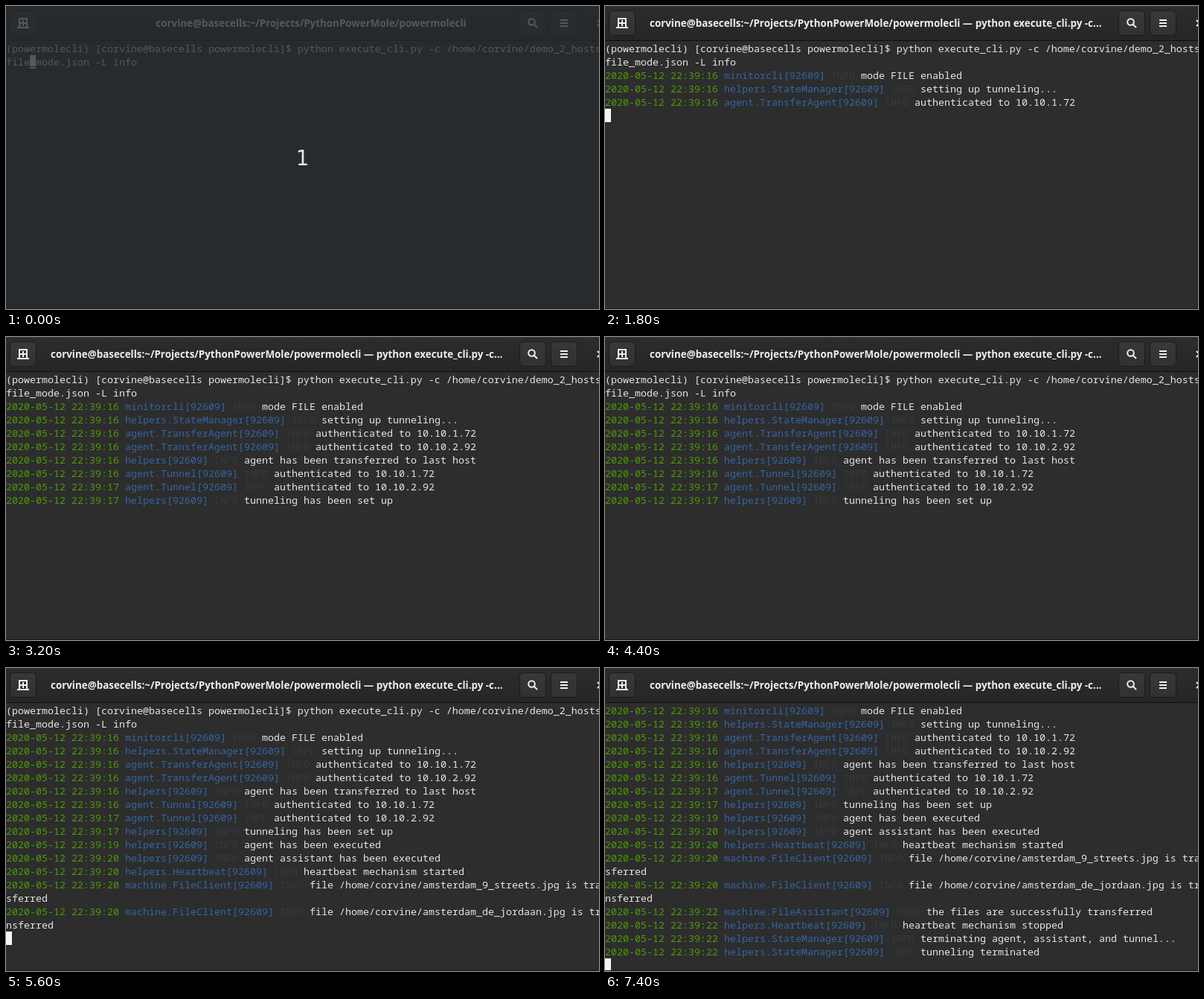
These frames come from a looping animation (797x407 px, 8 s). An HTML page with a canvas:

```html
<!DOCTYPE html>
<html lang="en">
<head>
<meta charset="utf-8">
<title>Terminal session</title>
<style>
  html, body { margin: 0; width: 100%; height: 100%; overflow: hidden; background: #2d2d2d; }
  canvas { display: block; }
</style>
</head>
<body>
<canvas id="stage" width="797" height="407"></canvas>
<script>
const ctx = document.getElementById('stage').getContext('2d');
const W = 797, H = 407, LOOP = 8000;
const COL = 8, ROW = 18, TOP = 48;
const MONO = '13.333px "Noto Sans Mono", monospace';
const TITLE = 'bold 13.4px "Noto Sans", sans-serif';
const BG = '#2d2d2d', FG = '#e6e6e6', GREEN = '#4e9a06', BLUE = '#3465a4', DIM = '#343c3e';

const user = 'corvine', host = 'basecells';
const home = '/home/' + user;
const shortTitle = `${user}@${host}:~/Projects/PythonPowerMole/powermolecli`;
const longTitle = shortTitle + ' — python execute_cli.py -c…';

const plain = text => [[text, FG]];
const log = (sec, source, msg) => [
  [`2020-05-12 22:39:${sec} `, GREEN],
  [`${source}[92609] `, BLUE],
  ['INFO ', DIM],
  [msg, FG]
];

const lines = [
  plain(`(powermolecli) [${user}@${host} powermolecli]$ python execute_cli.py -c ${home}/demo_2_hosts_`),
  plain('file_mode.json -L info'),
  log(16, 'minitorcli', 'mode FILE enabled'),
  log(16, 'helpers.StateManager', 'setting up tunneling...'),
  log(16, 'agent.TransferAgent', 'authenticated to 10.10.1.72'),
  log(16, 'agent.TransferAgent', 'authenticated to 10.10.2.92'),
  log(16, 'helpers', 'agent has been transferred to last host'),
  log(16, 'agent.Tunnel', 'authenticated to 10.10.1.72'),
  log(17, 'agent.Tunnel', 'authenticated to 10.10.2.92'),
  log(17, 'helpers', 'tunneling has been set up'),
  log(19, 'helpers', 'agent has been executed'),
  log(20, 'helpers', 'agent assistant has been executed'),
  log(20, 'helpers.Heartbeat', 'heartbeat mechanism started'),
  log(20, 'machine.FileClient', `file ${home}/amsterdam_9_streets.jpg is tran`),
  plain('sferred'),
  log(20, 'machine.FileClient', `file ${home}/amsterdam_de_jordaan.jpg is tra`),
  plain('nsferred'),
  log(22, 'machine.FileAssistant', 'the files are successfully transferred'),
  log(22, 'helpers.Heartbeat', 'heartbeat mechanism stopped'),
  log(22, 'helpers.StateManager', 'terminating agent, assistant, and tunnel...'),
  log(22, 'helpers.StateManager', 'tunneling terminated')
];

// start time, printed lines, cursor visible
const steps = [
  [0, 2, 1], [400, 2, 0], [600, 2, 1], [1200, 2, 0], [1400, 2, 1],
  [1800, 5, 1], [2000, 8, 0], [2400, 9, 0], [3000, 10, 1], [3200, 10, 0],
  [3800, 10, 1], [4400, 10, 0], [5000, 11, 1], [5600, 17, 1], [6000, 17, 0],
  [6200, 17, 1], [6800, 17, 0], [7400, 21, 1]
];

function rect(x, y, w, h, color) {
  ctx.fillStyle = color;
  ctx.fillRect(x, y, w, h);
}

function text(str, x, y, color, font, align = 'left') {
  ctx.font = font;
  ctx.textAlign = align;
  ctx.fillStyle = color;
  ctx.fillText(str, x, y);
}

function shade(y0, y1, from, to) {
  const g = ctx.createLinearGradient(0, y0, 0, y1);
  g.addColorStop(0, from);
  g.addColorStop(1, to);
  return g;
}

function stroke(width, ...paths) {
  ctx.strokeStyle = '#eeeeec';
  ctx.lineWidth = width;
  ctx.beginPath();
  for (const [start, ...rest] of paths) {
    ctx.moveTo(...start);
    rest.forEach(p => ctx.lineTo(...p));
  }
  ctx.stroke();
}

function button(x, w) {
  ctx.beginPath();
  ctx.roundRect(x + 0.5, 6.5, w - 1, 33, 5);
  ctx.fillStyle = shade(6, 40, '#383838', '#313131');
  ctx.fill();
  ctx.strokeStyle = '#1b1b1b';
  ctx.lineWidth = 1;
  ctx.stroke();
}

function header(title, x, align) {
  rect(0, 0, W, 46, shade(0, 46, '#2c2c2c', '#262626'));
  rect(0, 0, W, 1, '#363636');
  rect(0, 46, W, 1, '#101010');
  button(5, 36);
  button(690, 36);
  button(732, 36);

  stroke(2, [[18, 29], [18, 17], [28, 17], [28, 29]], [[15, 29], [31, 29]],
    [[23, 19], [23, 27]], [[19, 23], [27, 23]]);
  stroke(2, [[709.5, 24.5], [714, 29]]);
  ctx.beginPath();
  ctx.arc(706.5, 21.5, 4.3, 0, Math.PI * 2);
  ctx.stroke();
  stroke(2, ...[19, 23, 27].map(y => [[745, y], [755, y]]));
  stroke(2, [[795, 19], [803, 27]], [[803, 19], [795, 27]]);

  text(title, x, 28, '#eeeeec', TITLE, align);
}

function printLine(spans, row) {
  let col = 0;
  for (const [str, color] of spans) {
    text(str, col * COL, TOP + row * ROW + 14, color, MONO);
    col += str.length;
  }
}

function cursor(col, row, glyph) {
  rect(col * COL, TOP + row * ROW, COL, ROW, '#f4f4f4');
  if (glyph) text(glyph, col * COL, TOP + row * ROW + 14, BG, MONO);
}

function countdown() {
  rect(0, 0, W, H, 'rgba(39, 44, 48, 0.77)');
  text('1', 398.5, 214, '#e4e6e6', '27.5px "DejaVu Sans", sans-serif', 'center');
}

function draw(t) {
  const [, count, blink] = steps.findLast(s => s[0] <= t);
  const scroll = t >= 7400 ? 2 : 0;

  rect(0, 0, W, H, BG);
  lines.slice(scroll, count).forEach(printLine);
  if (blink) {
    if (t < 1400) cursor(4, 1, '_');
    else cursor(0, count - scroll);
  }
  if (t < 1800) header(shortTitle, 410, 'center');
  else header(longTitle, 60, 'left');
  rect(0, 406, W, 1, '#171717');
  if (t < 400) countdown();
}

const start = performance.now();
function frame() {
  draw((performance.now() - start) % LOOP);
  requestAnimationFrame(frame);
}
frame();
</script>
</body>
</html>
```
